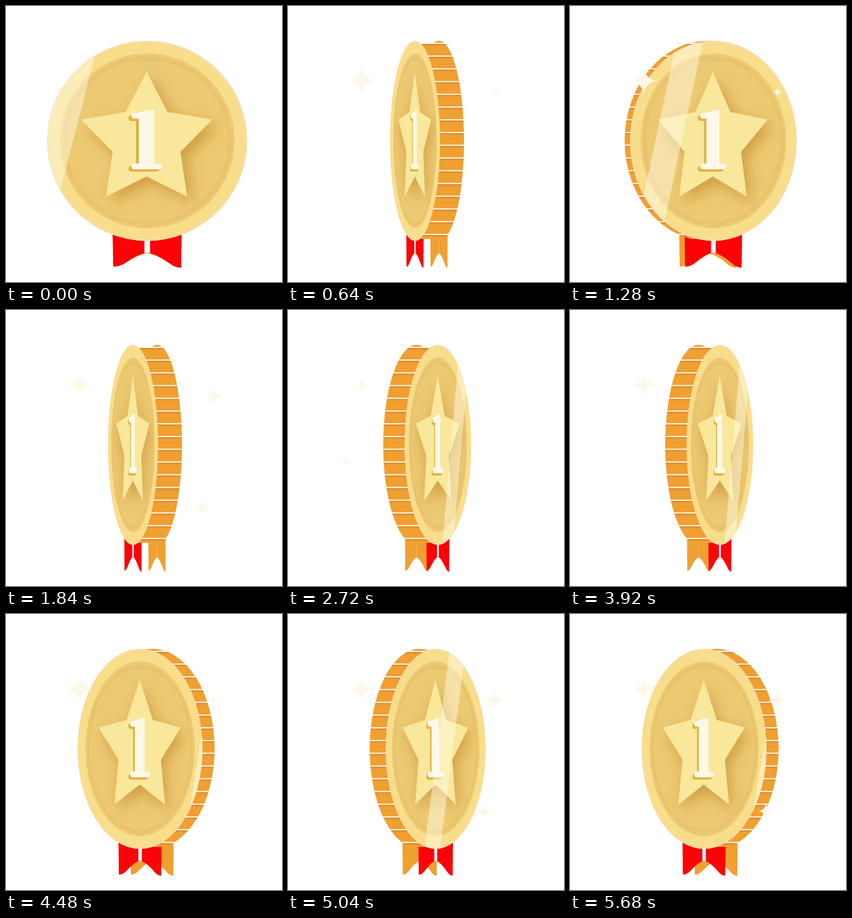
Write an HTML page with a canvas that moves like this. It is 480 px wide and 480 px high and loops after 5760 ms.

```html
<!DOCTYPE html>
<html lang="en">
<head>
<meta charset="utf-8">
<title>Spinning medal</title>
<style>
  html, body { margin: 0; width: 100%; height: 100%; overflow: hidden; background: #fff; }
  canvas { display: block; width: 480px; height: 480px; }
</style>
</head>
<body>
<canvas id="stage" width="480" height="480"></canvas>
<script>
const ctx = document.getElementById('stage').getContext('2d');
const STEP = 80, STEPS = 72, SPIN = 15;
const CX = 245.5, CY = 234.5, R = 174;
const NEAR = 0.131, FAR = 0.189;
const ORANGE = '#f09f31', RED = '#fa0408', CREAM = '#fff7e8';

// Each sparkle pulses through eight radii.
const sparkles = [
  { x: 128, y: 130, sizes: [22.5, 20, 10, 2, 1, 7, 14, 19.5] },
  { x: 360.5, y: 150, sizes: [7.5, 1, 0, 0, 4, 9, 13, 15.5] },
  { x: 341, y: 343, sizes: [1, 0, 1, 4, 8, 11, 13.5, 13] },
  { x: 101, y: 265, sizes: [0, 3, 8, 9, 6, 3, 0, 0] }
];

const numeral = new Path2D(
  'M258 181 L245 181 Q236 186 224 186 Q218 186 218 191 Q218 196 225 196 L231 196 ' +
  'L231 274 L223 274 Q218 275 218 279 Q218 284 224 284 L266 284 Q272 283 272 279 ' +
  'Q272 275 266 274 L258 274 Z');

function polygon(points) {
  ctx.beginPath();
  points.forEach(([x, y]) => ctx.lineTo(x, y));
  ctx.closePath();
}

function disc(radius, fill) {
  ctx.beginPath();
  ctx.arc(0, 0, radius, 0, Math.PI * 2);
  ctx.fillStyle = fill;
  ctx.fill();
}

function starPoints(outer, inner) {
  return Array.from({ length: 10 }, (_, i) => {
    const angle = i * Math.PI / 5 - Math.PI / 2;
    const r = i % 2 ? inner : outer;
    return [Math.cos(angle) * r - 1, Math.sin(angle) * r];
  });
}

function pose(step) {
  const k = step % SPIN;
  const opening = k >= 6;
  const half = R * (opening ? Math.min(1, (k - 6) / 8) : 1 - k / 6);
  const lost = R - half;
  return {
    half,
    front: CX + lost * (opening ? -FAR : NEAR),
    back: CX + lost * (opening ? NEAR : -FAR),
    gloss: opening ? (k < 11 ? 400 : 165 - (k - 11) * 116) : -184 + k * 63
  };
}

function ribbon(center, scale, color, split) {
  ctx.save();
  ctx.translate(center, 0);
  ctx.scale(scale, 1);
  const gap = split ? 5 : 0;
  if (split) {
    ctx.fillStyle = '#fff';
    ctx.fillRect(-6, 398, 12, 32);
    ctx.fillStyle = '#d8d4d0';
    ctx.fillRect(-5, 398, 2, 32);
    ctx.fillRect(-5, 428, 10, 2);
  }
  ctx.fillStyle = color;
  for (const side of [-1, 1]) {
    const low = side < 0 ? 453 : 455;
    ctx.beginPath();
    ctx.moveTo(side * gap, 398);
    ctx.lineTo(side * 60, 398);
    ctx.lineTo(side * 59, low);
    ctx.quadraticCurveTo(side * 50, low + 1, side * 38, 447);
    ctx.quadraticCurveTo(side * 20, 434, side * gap, 430);
    ctx.fill();
  }
  ctx.restore();
}

function edge({ half, front, back }) {
  const left = Math.min(front, back), width = Math.abs(front - back);
  if (width < 0.5) return;
  ctx.save();
  ctx.beginPath();
  ctx.ellipse(back, CY, half, R, 0, 0, Math.PI * 2);
  ctx.rect(left, 64, width, 341);
  ctx.clip();
  ctx.fillStyle = ORANGE;
  ctx.fillRect(0, 0, 480, 405);
  for (let i = 0; i < 16; i++) {
    const y = 65 + i * 22.15;
    ctx.fillStyle = '#dc8b2b';
    ctx.fillRect(0, y + 1, 480, 2.5);
    ctx.fillStyle = '#fffaf0';
    ctx.fillRect(0, y - 1, 480, 2);
  }
  ctx.restore();
}

function face({ half, front, gloss }) {
  if (half < 0.5) return;
  ctx.save();
  ctx.translate(front, CY);
  ctx.scale(half / R, 1);
  disc(R, '#fbd9ae');
  disc(R - 2, '#f8de8b');

  const groove = ctx.createRadialGradient(0, 0, 138, 0, 0, 152);
  groove.addColorStop(0, '#ecca72');
  groove.addColorStop(0.35, '#e8c26a');
  groove.addColorStop(1, '#edcb75');
  disc(152, groove);

  ctx.save();
  ctx.beginPath();
  ctx.arc(0, 0, 142, 0, Math.PI * 2);
  ctx.clip();
  ctx.shadowColor = 'rgba(190,125,35,.6)';
  ctx.shadowBlur = 26;
  ctx.shadowOffsetX = 10 * half / R;
  ctx.shadowOffsetY = 10;
  polygon(starPoints(120, 62));
  ctx.fillStyle = '#f9e79b';
  ctx.fill();
  ctx.restore();

  ctx.save();
  ctx.translate(-CX - 5, -CY + 4);
  ctx.fillStyle = '#e0b342';
  ctx.fill(numeral);
  ctx.translate(5, -4);
  ctx.fillStyle = '#fff8e8';
  ctx.fill(numeral);
  ctx.restore();

  ctx.beginPath();
  ctx.arc(0, 0, R - 1, 0, Math.PI * 2);
  ctx.clip();
  const lean = 0.256 * R;
  polygon([[gloss + lean, -R], [gloss + 55 + lean, -R],
    [gloss + 55 - lean, R], [gloss - lean, R]]);
  ctx.fillStyle = 'rgba(255,252,235,.45)';
  ctx.fill();
  ctx.restore();
}

function sparkle({ x, y, sizes }, step) {
  const r = sizes[step % 8], n = r * 0.16;
  if (!r) return;
  ctx.beginPath();
  ctx.moveTo(x, y - r);
  ctx.quadraticCurveTo(x + n, y - n, x + r, y);
  ctx.quadraticCurveTo(x + n, y + n, x, y + r);
  ctx.quadraticCurveTo(x - n, y + n, x - r, y);
  ctx.quadraticCurveTo(x - n, y - n, x, y - r);
  ctx.fillStyle = CREAM;
  ctx.fill();
}

function draw() {
  const step = Math.floor(performance.now() / STEP) % STEPS;
  const coin = pose(step);
  ctx.fillStyle = '#fff';
  ctx.fillRect(0, 0, 480, 480);
  ribbon(coin.back, coin.half / R, ORANGE, false);
  ribbon(coin.front, coin.half / R, RED, true);
  edge(coin);
  face(coin);
  if (step > 0) sparkles.forEach(s => sparkle(s, step));
  requestAnimationFrame(draw);
}
draw();
</script>
</body>
</html>
```
